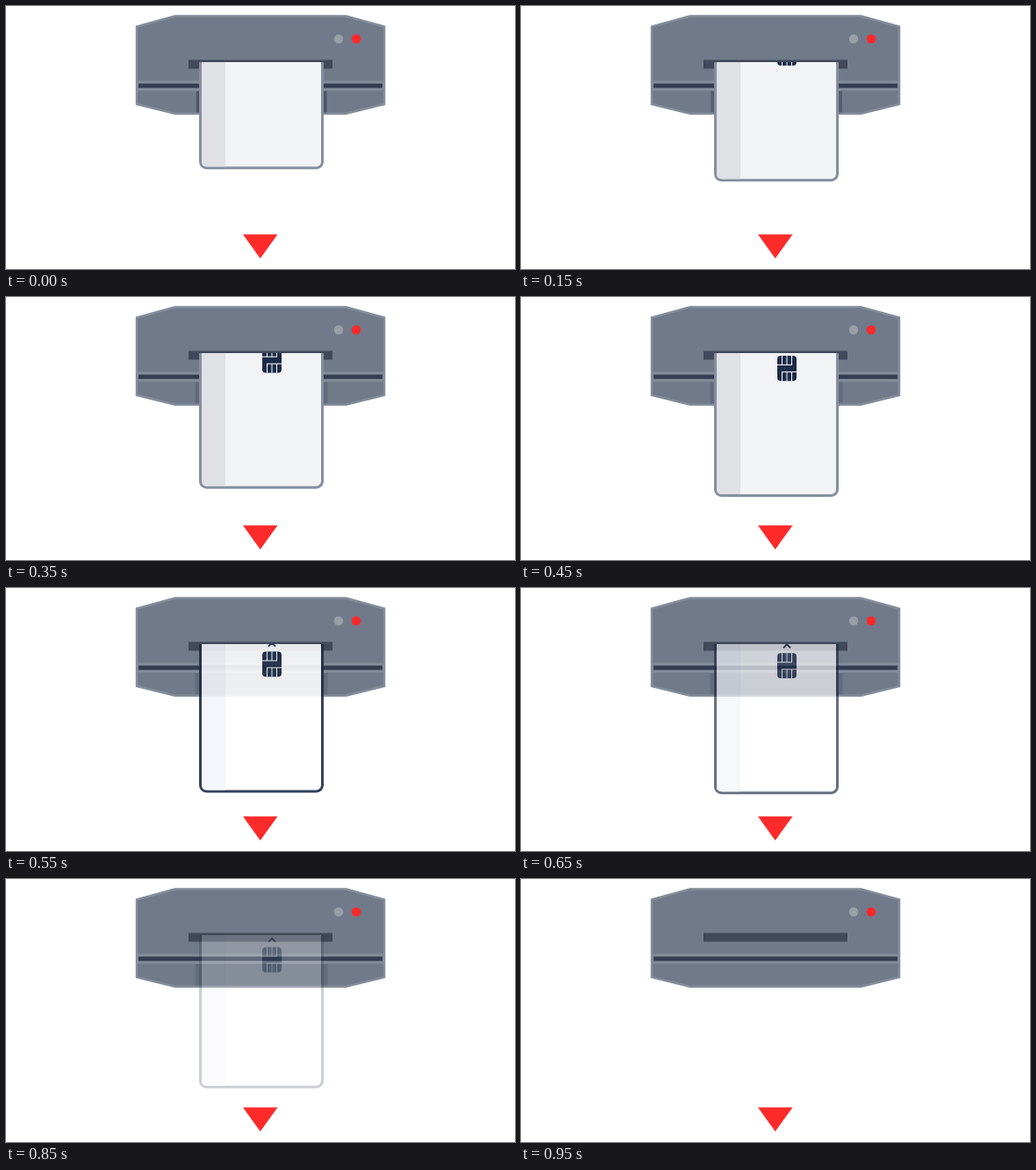
These frames come from a looping animation (580 px wide and 300 px high, 1000 ms). An HTML page:

```html
<!DOCTYPE html>
<html lang="en">
<head>
<meta charset="utf-8">
<title>Card printer</title>
<style>
html, body { margin: 0; width: 100%; height: 100%; overflow: hidden; background: #fff; }
svg { display: block; width: 580px; height: 300px; }
</style>
</head>
<body>
<svg viewBox="0 0 580 300">
  <clipPath id="below"><rect x="200" y="64" width="180" height="236"/></clipPath>

  <path d="M149 23.5 192.500 11.500H387.500L431 23.500V112L387.500 122.700H192.500L149 112Z" fill="#717a8a" stroke="#838d9b" stroke-width="2.500"/>
  <path d="M149 91H431" stroke="#838d9b" stroke-width="11"/>
  <path d="M151 91H429" stroke="#343d50" stroke-width="5"/>
  <rect x="208" y="61.500" width="164" height="10" fill="#40485a"/>
  <circle cx="379" cy="37.500" r="5.200" fill="#999fa8"/>
  <circle cx="399" cy="37.500" r="5.200" fill="#ff2828"/>
  <path d="M270 260.500H309.500L289.700 288Z" fill="#ff2a2a"/>

  <rect id="shadow" y="97" height="24.500" fill="#343d50"/>

  <g clip-path="url(#below)">
    <!-- y = 0 is the lower edge of the card -->
    <g id="card">
      <rect id="sheet" x="221.500" y="-201.500" width="139" height="200" rx="7"/>
      <path id="band" d="M250 -200V-3H229Q223 -3 223 -9V-200Z"/>
      <g transform="translate(292 -161)">
        <rect width="22" height="28.700" rx="4" fill="#1b2a47"/>
        <path d="M5.500 0V10.500M11 0V10.500M16.500 0V10.500M0 10.500H17M5.500 29V18.500M11 29V18.500M16.500 29V18.500M5 18.500H22" fill="none" stroke="#fff"/>
        <path d="M7 -5.800 11 -9.800 15 -5.800" fill="none" stroke="#1b2a47" stroke-width="2"/>
      </g>
    </g>
  </g>
</svg>
<script>
const LOOP = 1000, STEP = 50, EJECTED = 500, GONE = 950;
const set = (id, attrs) => {
  const el = document.getElementById(id);
  for (const key in attrs) el.setAttribute(key, attrs[key]);
};

function draw(now) {
  const t = Math.floor((now + 1) / STEP) * STEP % LOOP;
  const out = Math.min(t, EJECTED), drift = t - out;
  const fading = t >= EJECTED;
  const y = 186.3 + out * 0.0925 + drift * 0.0175;
  const alpha = Math.max(0, 1 - drift / (GONE - EJECTED));

  set("card", { transform: `translate(0 ${y})`, opacity: alpha });
  set("sheet", {
    fill: fading ? "#fff" : "#f2f3f5",
    stroke: fading ? "#1b2a47" : "#858fa0",
    "stroke-width": 3
  });
  set("band", { fill: fading ? "#f4f6fb" : "#e0e1e5" });

  const spread = Math.min(1, t / 400);
  set("shadow", {
    x: 217 - 1.5 * spread,
    width: 148.5 + 2.5 * spread,
    opacity: t < GONE ? 0.6 - 0.38 * spread : 0
  });
  requestAnimationFrame(draw);
}
requestAnimationFrame(draw);
</script>
</body>
</html>
```
